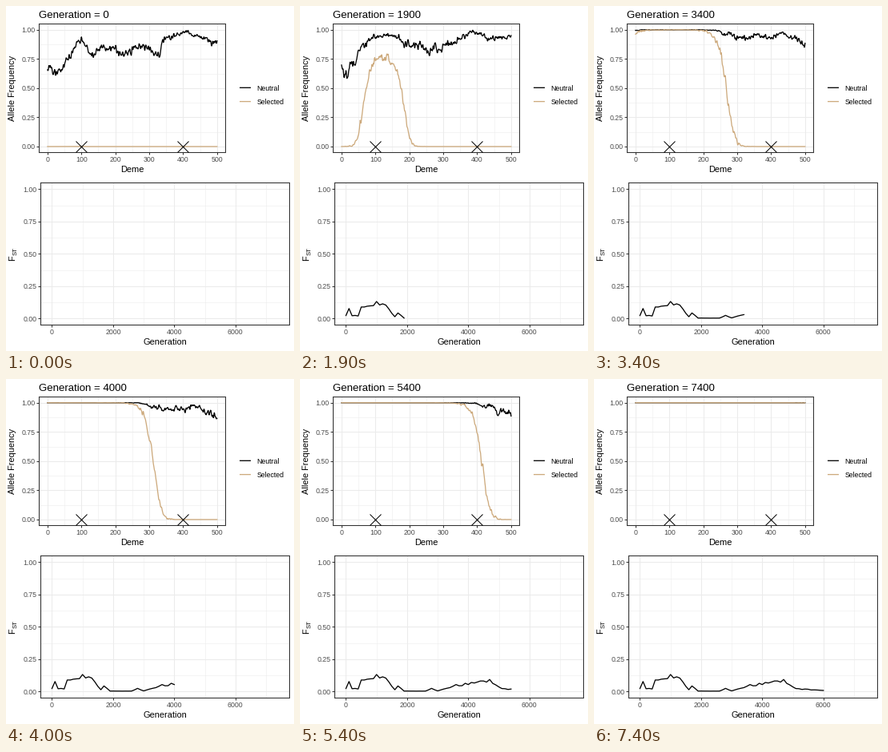
Animation of 360x432 px, one loop 7.5 s. Source, as a matplotlib script:

```python
import numpy as np
import matplotlib.pyplot as plt
from matplotlib.animation import FuncAnimation
from matplotlib.lines import Line2D

W, H = 360, 432
FRAMES, STEP = 75, 100
LW = 1.3
INK, TAN, GRID = "black", "#CDAA7D", "#EBEBEB"
plt.rcParams["font.family"] = "Liberation Sans"

demes = np.arange(501)
rng = np.random.default_rng(7)


def profile(*points):
    return np.interp(demes, *zip(*points))


# Neutral background: early ripples settle, then drift upwards
EARLY = profile((0, .66), (38, .66), (100, .92), (135, .78), (165, .87),
                (225, .79), (260, .87), (330, .79), (340, .91), (400, .98),
                (500, .90))
MIDDLE = profile((0, .67), (15, .6), (60, .8), (160, .8), (220, .88),
                 (265, .81), (310, .87), (380, .985), (450, .91), (500, .96))
LATE = profile((0, .94), (400, .94), (440, .97), (500, .87))


def smooth_noise(width):
    """Unit-variance noise per frame, correlated over `width` demes."""
    kernel = np.hanning(width + 2)
    kernel /= np.sqrt((kernel ** 2).sum())
    raw = rng.standard_normal((FRAMES, len(demes) + width + 1))
    return np.array([np.convolve(row, kernel, "valid") for row in raw])


fine_n, fine_s, coarse = smooth_noise(4), smooth_noise(4), smooth_noise(24)


def fst_series():
    gens = np.arange(0, 6001, STEP)
    base = np.interp(gens, *zip(
        (0, .02), (100, .08), (200, .02), (400, .02), (500, .092), (900, .1),
        (1000, .122), (1300, .105), (1600, .012), (1700, .046), (1900, .002),
        (2600, .002), (2800, .022), (3000, .004), (3600, .045), (4500, .08),
        (4800, .068), (5100, .022), (6000, .007)))
    return gens, base * (1 + .1 * rng.standard_normal(len(gens)))


fst_gens, fst = fst_series()


def jitter(p, noise):
    return np.clip(p + noise * np.sqrt(p * (1 - p)), 0, 1)


def wave(dist, width):
    """Travelling front: 1 behind, 0 ahead, one half at dist 0."""
    return (1 + np.exp(np.clip(dist / width - .88, -50, 50))) ** -2


def sweep(g):
    """Spread of the selected allele from deme 100 in both directions."""
    width = np.interp(g, [0, 2600], [6, 14.5])
    right = np.interp(g, [0, 2600, 6200, 7400], [105, 210, 471, 600])
    left = 100 - 74 * (g / 2600) ** 2.5
    height = 1 / (1 + np.exp(-.004 * (g - 1600)))
    return height * wave(demes - right, width) * wave(left - demes, width)


def background(g):
    settle = np.clip(g / 1100, 0, 1)
    drift = np.clip((g - 2600) / 900, 0, 1)
    p = EARLY + (MIDDLE - EARLY) * settle
    return p + (LATE - p) * drift


def frequencies(i):
    s = sweep(i * STEP)
    n = 1 - (1 - background(i * STEP)) * (1 - s)  # hitchhiking
    return (jitter(n, .045 * fine_n[i] + .03 * coarse[i]),
            jitter(s, .04 * fine_s[i]))


def label(x, y, text, size, **kw):
    return fig.text(x / W, 1 - y / H, text, fontsize=size, **kw)


def panel(left, top, right, bottom, xmax, major, minor):
    ax = fig.add_axes([left / W, 1 - bottom / H,
                       (right - left) / W, (bottom - top) / H])
    ax.set_xlim(-.05 * xmax, 1.05 * xmax)
    ax.set_ylim(-.05, 1.05)
    levels = np.linspace(0, 1, 5)
    ax.set_xticks(major)
    ax.set_xticks(minor, minor=True)
    ax.set_yticks(levels, [f"{v:.2f}" for v in levels])
    ax.set_yticks(levels[:-1] + .125, minor=True)
    ax.set_axisbelow(True)
    ax.grid(which="major", color=GRID, lw=1.07)
    ax.grid(which="minor", color=GRID, lw=.53)
    ax.tick_params(which="major", length=2.75, width=1.07, pad=2.2,
                   color="#333333", labelcolor="#4D4D4D", labelsize=8.8)
    ax.tick_params(which="minor", length=0)
    for spine in ax.spines.values():
        spine.set(color="#333333", linewidth=1.07)
    return ax


def curve(ax, color, zorder):
    return ax.plot([], [], color=color, lw=LW, zorder=zorder, snap=False)[0]


fig = plt.figure(figsize=(W / 72, H / 72), dpi=72, facecolor="white")
top = panel(41.3, 22.4, 274.4, 183.3, 500,
            range(0, 501, 100), range(50, 500, 100))
low = panel(43.3, 221.4, 354.4, 399.2, 7400,
            range(0, 6001, 2000), range(1000, 7001, 2000))

neutral_line = curve(top, INK, 3)
selected_line = curve(top, TAN, 4)
fst_line = curve(low, INK, 3)
top.plot([100, 400], [0, 0], "x", color=INK, ms=14, mew=1, zorder=5)

title = label(41, 15, "", 13.2)
label(157.5, 208, "Deme", 11, ha="center")
label(199, 424, "Generation", 11, ha="center")
label(13, 103, "Allele Frequency", 11, rotation=90, ha="right", va="center")
label(13, 319, "F", 11, rotation=90, ha="right", va="bottom")
label(15.5, 312, "ST", 7.7, rotation=90, ha="right", va="bottom")

for y, name, color in ((102.3, "Neutral", INK), (119.6, "Selected", TAN)):
    fig.add_artist(Line2D([292 / W, 306 / W], [1 - y / H] * 2, color=color,
                          lw=LW, solid_capstyle="butt", snap=False))
    label(313.5, y + 3.2, name, 8.8)


def update(i):
    title.set_text(f"Generation = {i * STEP}")
    neutral, selected = frequencies(i)
    neutral_line.set_data(demes, neutral)
    selected_line.set_data(demes, selected)
    fst_line.set_data(fst_gens[:i + 1], fst[:i + 1])
    return title, neutral_line, selected_line, fst_line


anim = FuncAnimation(fig, update, frames=FRAMES, interval=100, repeat=True)
plt.show()
```
